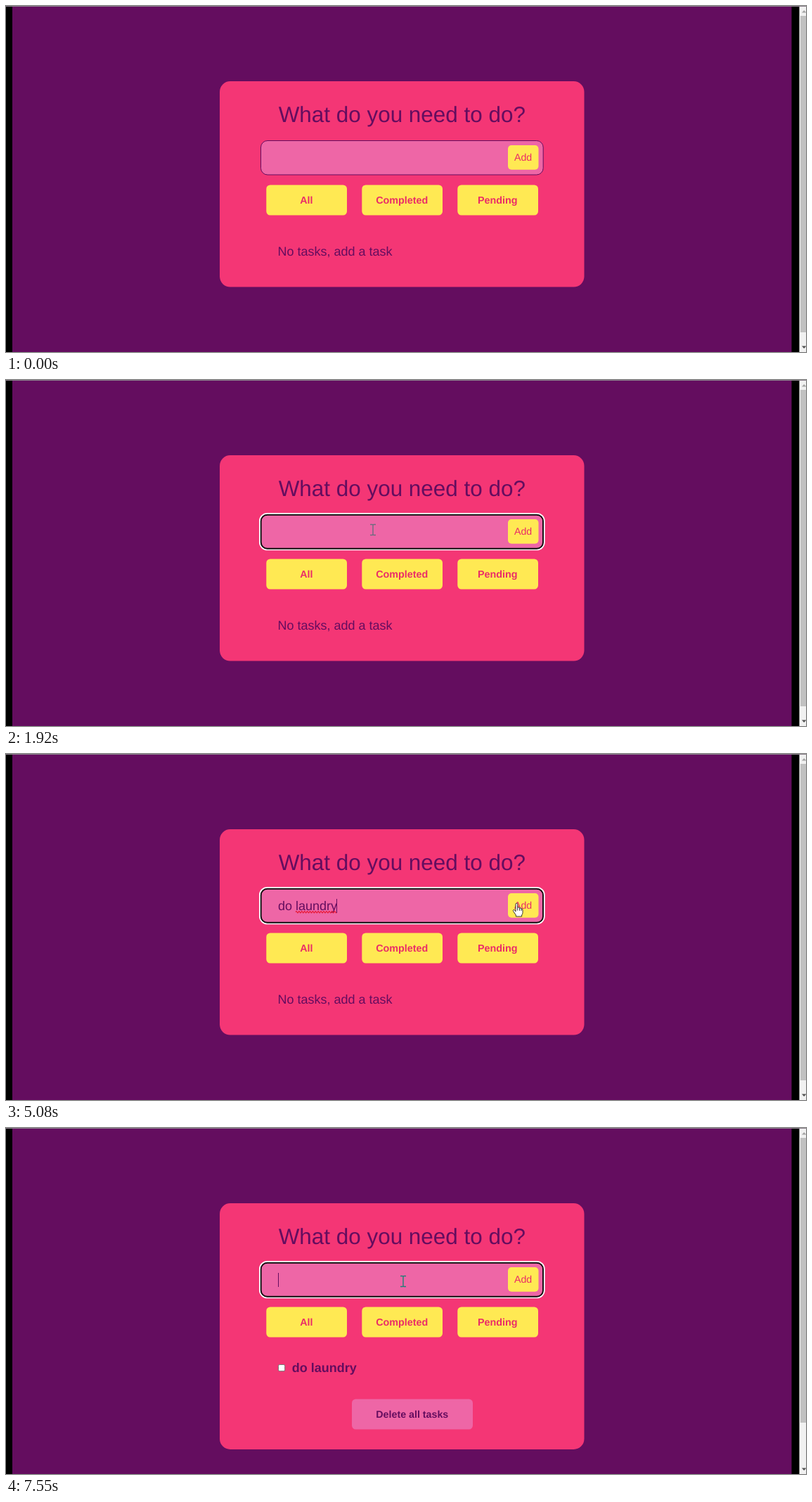
Animation, 1138 px wide and 492 px high, one loop 8 s. Source, as an HTML page:

```html
<!DOCTYPE html>
<html lang="en">
<head>
<meta charset="utf-8">
<title>To-do list</title>
<style>
  html, body { margin: 0; width: 100%; height: 100%; overflow: hidden; background: #640d5f; }
  svg { display: block; width: 1138px; height: 492px; }
  text { font-family: "Liberation Sans", Arial, sans-serif; fill: #640d5f; text-rendering: geometricPrecision; white-space: pre; }
  .mid { text-anchor: middle; }
  .bold { font-weight: bold; }
  .yellow { fill: #ffe953; }
  .pink { fill: #ee66a6; }
  .rose { fill: #ea2c68; }
  .body { font-size: 18px; }
  .btn { font-size: 14.35px; }
</style>
</head>
<body>
<svg viewBox="0 0 1138 492">
  <rect width="1138" height="492" fill="#000"/>
  <rect x="9" width="1108.5" height="492" fill="#640d5f"/>
  <rect width="1138" height="1" fill="#8b7f8b"/>

  <rect x="1128.5" y="1" width="10" height="491" fill="#f1f1f1"/>
  <rect id="thumb" x="1130" y="14" width="8" fill="#c1c1c1"/>
  <path d="M1132 9.5l3.2-3.5 3.2 3.5z" fill="#a3a3a3"/>
  <path d="M1132 483.5l3.2 3.5 3.2-3.5z" fill="#505050"/>

  <rect id="card" x="304" y="107" width="518.5" rx="15" fill="#f43675"/>
  <text class="mid" x="563.3" y="165.3" font-size="31.45">What do you need to do?</text>

  <rect class="pink" x="362.5" y="191.5" width="401.7" height="48.5" rx="9.5" stroke="#640d5f"/>
  <g id="ring" fill="none">
    <rect x="361" y="190" width="404.7" height="51.3" rx="10.5" stroke="#fff" stroke-width="2"/>
    <rect x="362.7" y="191.7" width="401.3" height="48" rx="9" stroke="#101010" stroke-width="1.9"/>
  </g>
  <text id="typed" class="body" x="387" y="222"></text>
  <path id="squiggle" fill="none" stroke="#e8122c" stroke-width="1.1"/>
  <rect id="caret" y="206" width="1" height="20" fill="#640d5f"/>

  <rect class="yellow" x="714" y="198" width="43.5" height="34.7" rx="5"/>
  <text class="mid rose" x="735.6" y="220.3" font-size="14.2">Add</text>
  <g id="filters"></g>

  <text id="empty" class="body" x="386.5" y="354.8">No tasks, add a task</text>
  <g id="list">
    <rect x="387.5" y="336.5" width="9.2" height="9.2" rx="1.8" fill="#fff" stroke="#767676"/>
    <text class="body bold" x="406.8" y="347">do laundry</text>
    <rect class="pink" x="492" y="385.5" width="172" height="43" rx="5.5"/>
    <text class="mid bold" x="577.8" y="411.6" font-size="14.25">Delete all tasks</text>
  </g>

  <g id="cursor">
    <path id="arrow" d="M0 0V16L3.7 12.5 6.2 18.3 8.8 17.2 6.3 11.5H11.5Z" fill="#fff" stroke="#111" stroke-width=".9"/>
    <path id="beam" d="M-4-7.5H-1Q0-7.5 0-6.5Q0-7.5 1-7.5H4M0-6.5V6.5M-4 7.5H-1Q0 7.5 0 6.5Q0 7.5 1 7.5H4" fill="none" stroke-width="1.4"/>
    <g id="hand" stroke="#222" stroke-width=".9" stroke-linejoin="round">
      <path d="M-3 2V-8.2Q-3-9.8-1.7-9.8T-.3-8.2V-3.6Q1.9-4.7 2.5-2.9Q4.6-3.7 5-1.9Q7-2.4 7 0V3.5Q7 5.6 5.6 7V9H-2.6V7.1L-6.3 1.7Q-7.2.2-6-.5T-3 2Z" fill="#fff"/>
      <path d="M-.3-3.6V.6M2.5-2.9V.8M5-1.9V1" fill="none"/>
    </g>
  </g>
</svg>
<script>
const LOOP = 8000;
const $ = id => document.getElementById(id);
const show = (id, on) => $(id).style.display = on ? '' : 'none';
const set = (id, name, value) => $(id).setAttribute(name, value);
const within = (t, spans) => spans.some(([a, b]) => t >= a && t < b);

// [time, shape, x, y]
const moves = [
  [0, 'none', 0, 0],
  [70, 'arrow', 999, 428], [135, 'arrow', 958, 388], [200, 'arrow', 893, 333],
  [266, 'arrow', 821, 282], [332, 'hand', 742, 264], [397, 'arrow', 668, 248],
  [463, 'arrow', 606, 242], [528, 'beam', 562, 235], [594, 'beam', 534, 220],
  [660, 'beam', 522, 213],
  [4610, 'beam', 681, 219], [4691, 'beam', 701, 220], [4773, 'hand', 719, 221],
  [4854, 'hand', 726, 222], [4936, 'hand', 728, 222],
  [7160, 'hand', 720, 221], [7223, 'beam', 655, 217], [7287, 'beam', 604, 217],
  [7350, 'beam', 565, 218]
];
const phrase = 'do laundry';
const keys = [2190, 2320, 2530, 2750, 2870, 2990, 3210, 3270, 3500, 3650];
const CLEAR = 6040, ADDED = 6570;
const focus = [[1380, 5180], [7490, LOOP]];
const caretOn = [[1380, 1920], [2190, 4140], [4650, 5150], [7490, LOOP]];

$('filters').innerHTML = ['All', 'Completed', 'Pending'].map((name, i) => {
  const x = 370.3 + 136 * i;
  return `<rect class="yellow" x="${x}" y="254.5" width="114.7" height="43" rx="5.5"/>
    <text class="mid bold rose btn" x="${x + 57}" y="281.2">${name}</text>`;
}).join('');

let wave = 'M412 224.8';
for (let i = 0; i < 15; i++) wave += `q1-2.4 2 0t1.9 0`;
set('squiggle', 'd', wave);

function drawCursor(t) {
  const [, shape, x, y] = moves.findLast(m => m[0] <= t);
  for (const id of ['arrow', 'beam', 'hand']) show(id, id === shape);
  set('cursor', 'transform', `translate(${x} ${y})`);
  set('beam', 'stroke', t < 4610 ? '#6f6c80' : '#237f78');
}

function render(t) {
  const count = t < CLEAR ? keys.filter(k => k <= t).length : 0;
  const added = t >= ADDED;
  $('typed').textContent = phrase.slice(0, count);
  const width = count ? $('typed').getComputedTextLength() : 0;
  set('caret', 'x', Math.round(387 + width - (count ? 1 : 0)));
  show('caret', within(t, caretOn));
  show('ring', within(t, focus));
  show('squiggle', t >= 4610 && t < CLEAR);
  show('empty', !added);
  show('list', added);
  set('card', 'height', added ? 350 : 292.6);
  set('thumb', 'height', added ? 405 : 450);
  drawCursor(t);
}

const start = performance.now();
function tick() {
  render((performance.now() - start) % LOOP);
  requestAnimationFrame(tick);
}
tick();
</script>
</body>
</html>
```
